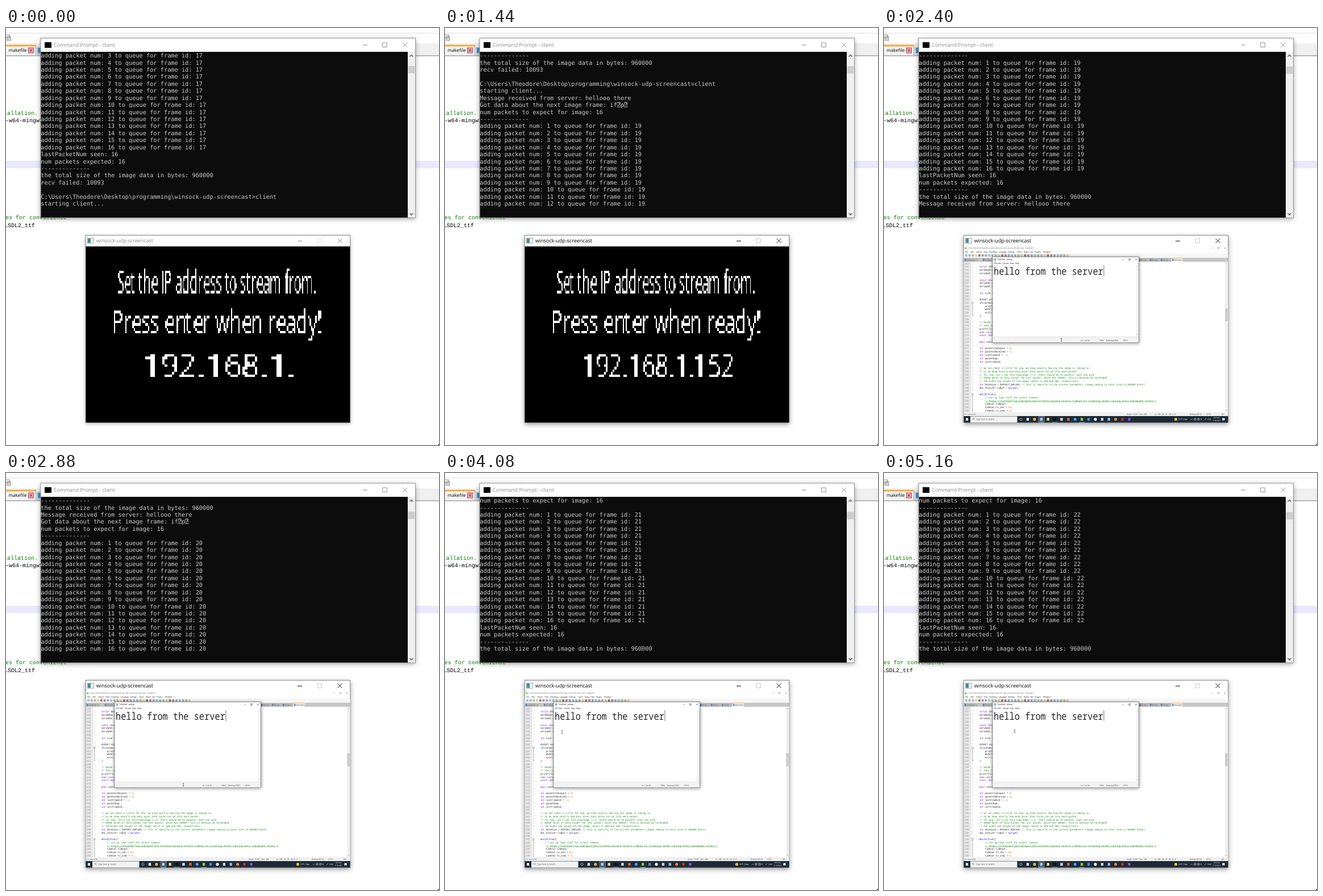
Recreate the animation shown at these times as an HTML page with a canvas. Size 762 by 735 pixels, loop 5.4 s.

```html
<!DOCTYPE html>
<html lang="en">
<head>
<meta charset="utf-8">
<title>UDP screencast</title>
<style>
html, body { margin: 0; width: 100%; height: 100%; overflow: hidden; background: #fff; }
svg, #prompt { position: absolute; left: 0; top: 0; display: block; }
text { white-space: pre; text-rendering: geometricPrecision; }
</style>
</head>
<body>
<svg id="stage" width="762" height="735" viewBox="0 0 762 735"></svg>
<canvas id="prompt" width="762" height="735"></canvas>
<script>
const SANS = '"Open Sans", "Noto Sans", sans-serif';
const MONO = '"DejaVu Sans Mono", monospace';
const COURIER = '"Liberation Mono", monospace';
const STRETCH = 1.185; // the streamed desktop is squeezed to 3:2
const LOOP = 5400;
const stage = document.getElementById('stage');

function add(parent, tag, attrs) {
  const el = document.createElementNS('http://www.w3.org/2000/svg', tag);
  for (const k in attrs) el.setAttribute(k, attrs[k]);
  return parent.appendChild(el);
}
const group = (p, attrs = {}) => add(p, 'g', attrs);
const rect = (p, x, y, width, height, fill, more = {}) =>
  add(p, 'rect', { x, y, width, height, fill, ...more });
const dot = (p, cx, cy, r, fill) => add(p, 'circle', { cx, cy, r, fill });
const line = (p, d, stroke, width = 1) =>
  add(p, 'path', { d, stroke, fill: 'none', 'stroke-width': width });
function text(p, x, y, str, size, fill = '#000', font = SANS, more = {}) {
  const el = add(p, 'text', { x, y: y + size * 0.36, fill, 'font-size': size, 'font-family': font, ...more });
  el.textContent = str;
  return el;
}
// Text inside the streamed desktop, y is the middle of the line
function tiny(p, x, y, str, size = 3.6, fill = '#333', font = SANS) {
  const g = group(p, { transform: `translate(${x} ${y}) scale(1 ${STRETCH})` });
  return text(g, 0, 0, str, size, fill, font);
}
const cross = (x, y, r) => `M${x - r} ${y - r}l${2 * r} ${2 * r}M${x + r} ${y - r}l${-2 * r} ${2 * r}`;
const box = (x, y, r) => `M${x - r} ${y - r}h${2 * r}v${2 * r}h${-2 * r}z`;
const dash = (x, y, r) => `M${x - r} ${y}h${2 * r}`;

function drawEditor(p) {
  rect(p, 0, 0, 762, 735, '#fff');
  rect(p, 0, 8.5, 762, 1, '#dcdcdc');
  line(p, 'M-1 12h7v5h-7zM2 15h6v7h-6z', '#888', 1.2);
  line(p, 'M3.5 18h3M3.5 20h3', '#999');
  rect(p, 0, 27, 762, 21.5, '#f0f0f0');
  rect(p, 0, 30, 53, 18, '#f4f4f4');
  rect(p, 0, 29.5, 53, 3, '#faaa3c');
  rect(p, 52, 30, 1, 18, '#999');
  rect(p, 54, 33, 8, 15, '#d0d0d0');
  rect(p, 56, 35, 6, 9, '#3c8fd0');
  text(p, 4.5, 39.5, 'makefile', 8.1);
  rect(p, 39.5, 35, 9, 9, '#e9b8bf', { stroke: '#b0364c' });
  line(p, cross(44, 39.5, 2.2), '#b02a40', 1.2);
  rect(p, 0, 48.3, 762, 1.2, '#8c8c8c');
  rect(p, 0, 234, 762, 13, '#e8e8ff');
  const green = '#008000';
  text(p, -4, 149, 'tallation.', 10, green, COURIER);
  text(p, -1, 162, '-w64-mingw32', 10, '#000', COURIER);
  text(p, -1, 333.5, 'es for convenience', 10, green, COURIER);
  text(p, -3, 347, 'LSDL2_ttf', 10, '#000', COURIER);
  rect(p, 760.5, 733, 1.5, 2, '#444');
}

function drawConsole(p) {
  rect(p, 61, 18, 659.5, 316.5, '#fff', { style: 'filter:drop-shadow(0 2px 4px rgba(0,0,0,.38))' });
  rect(p, 61, 18, 659.5, 316.5, '#fff', { stroke: '#8a8a8a', 'stroke-width': 0.9 });
  rect(p, 68, 25, 12, 10, '#000');
  text(p, 84, 30, 'Command Prompt - client', 9, '#8a8a8a');
  line(p, dash(632, 30, 4) + box(666.5, 29.8, 3.8) + cross(702.3, 29.8, 4), '#858585', 0.9);
  rect(p, 61.5, 42, 646, 292, '#0c0c0c');
  rect(p, 707, 42, 13, 292, '#f0f0f0');
  line(p, 'M710.5 50.5l3-3 3 3M710.5 326.5l3 3 3-3', '#505050', 1.3);
  const thumb = rect(p, 707.7, 67, 11.6, 13, '#cdcdcd');
  const rows = [];
  for (let i = 0; i < 22; i++)
    rows.push(text(p, 61.3, 48.4 + i * 12.43, '', 10.29, '#ccc', MONO));
  return { rows, thumb };
}

const CODE = `
    struct SOCKADDR_IN servAddr;
    ZeroMemory(&servAddr, sizeof(servAddr));
    servAddr.sin_family = AF_INET;

    const char* ipAddr;
    servAddr.sin_addr
    servAddr.sin_port

    int size = sizeof(

    SOCKET connSocket
    if(connect(connSocket
        printf("failed
        WSACleanup();
        exit(1);
    }

    // maybe send
    // than id
    printf("connected
    std::string msg
    const char* buf

    bool sentInitial = false;

    int packetsToExpect = 0;
    int packetsReceived = 0;
    int lastFrameId = -1;
    int packetNum;
    int currFrameId;

    // we can cheat a little for now. we know exactly how big the image is coming in,
    // so we know exactly how many pixel data bytes can go into each packet.
    // for now, let's use this knowledge (i.e. there should be 16 packets, each one with
    // 60000 bytes of data except the last packet, which has 58000). this is because we hardcoded
    // the width and height of the image, which is 600 and 400, respectively.
    int dataSize = DEFAULT_BUFLEN; // this is specific to the current parameters (image coming in total size is 960000 bytes)
    SDL_Texture* txBuf = nullptr;

    while(true){
        // set up time stuff for select timeout
        // https://stackoverflow.com/questions/21743231/winsock-selects-timeout-on-listening-socket-causing-every-subsequent-select-r
        timeval timeout;
        timeout.tv_sec = 60;
        timeout.tv_usec = 0;`.split('\n');

function codeLine(p, y, str) {
  const el = tiny(p, 158.3, y, '', 4.03, '#222', COURIER);
  const parts = str.split(/(\/\/.*|\b(?:int|const|char|bool|struct)\b|\b(?:while|if|true|false|nullptr)\b|\b\d+\b)/);
  for (const s of parts) {
    const fill = /^\/\//.test(s) ? '#1c8a1c' : /^(int|const|char|bool|struct)$/.test(s) ? '#8000ff'
      : /^(while|if|true|false|nullptr)$/.test(s) ? '#0000d0' : /^\d+$/.test(s) ? '#ff8000' : '#222';
    add(el, 'tspan', { fill }).textContent = s;
  }
}

function drawNotes(p) {
  rect(p, 191, 403.5, 257.5, 151, '#fff', {
    stroke: '#666', 'stroke-width': 0.7, style: 'filter:drop-shadow(0 1px 3px rgba(0,0,0,.45))' });
  rect(p, 194, 406, 3, 4, '#6fb4d6');
  tiny(p, 199, 408, '*Untitled - Jotting', 3.3, '#111');
  line(p, dash(420.5, 408, 1.3) + box(432, 408, 1.3) + cross(443.5, 408, 1.3), '#333', 0.6);
  ['File', 'Edit', 'Format', 'View', 'Help'].forEach((s, i) =>
    tiny(p, [193.5, 200, 209, 221.5, 231][i], 415, s, 3.2, '#111'));
  rect(p, 443.5, 418, 4.5, 125, '#f3f3f3');
  line(p, 'M445 421l1-1 1 1M445 540l1 1 1-1', '#888', 0.5);
  rect(p, 191.5, 543, 256.5, 4.8, '#f0f0f0');
  rect(p, 191.5, 547.8, 256.5, 6.4, '#f3f3f3');
  [[346, 'Ln 1, Col 22'], [379, '100%'], [391, 'Desktop (CRLF)'], [420.5, 'UTF-8']]
    .forEach(([x, s]) => tiny(p, x, 551, s, 3));
  tiny(p, 193, 428, 'hello from the server', 15.3, '#262626', '"Noto Sans Mono", monospace');
  rect(p, 386.6, 418, 0.7, 19, '#333');
}

function drawTaskbar(p) {
  rect(p, 140.5, 684, 465, 11.5, '#1d2a36');
  rect(p, 144, 687.5, 4, 4.5, '#fff');
  rect(p, 152, 684.5, 82.5, 11, '#f3f3f3');
  add(p, 'circle', { cx: 157.5, cy: 689, r: 1.4, fill: 'none', stroke: '#444', 'stroke-width': 0.5 });
  tiny(p, 162, 690, 'Type here to search', 3.5, '#555');
  rect(p, 271, 684, 12, 11.5, '#4d5a65');
  add(p, 'circle', { cx: 241, cy: 689.7, r: 2, fill: 'none', stroke: '#fff', 'stroke-width': 0.6 });
  const icons = ['#ddd', '#e0b040', '#9ad4e8', '#f0d070', '#111', '#d8d8d8', '#e06030', '#40a0e0', '#8cc63f',
    '#4a90d0', '#e8e8e8', '#c8d4dc', '#90b8d8', '#e08030', '#c03030', '#8050d0'];
  icons.forEach((c, i) => {
    const x = 253 + i * 11.9;
    if (i % 3 === 1) dot(p, x, 689.7, 2.7, c);
    else rect(p, x - 2.2, 687.2, 4.4, 5, c);
  });
  [277, 300.6, 348].forEach(x => rect(p, x - 5, 694.6, 10, 0.9, '#76b9ed'));
  dot(p, 513.5, 689.7, 2.6, '#f2b632');
  tiny(p, 518, 690, '53°F  Clear', 3.3, '#fff');
  line(p, 'M540 690.5l1.5-1.5 1.5 1.5M546 688h3v3h-3zM552 688h3v3h-3zM558 691v-3M564 691l3-3', '#ddd', 0.7);
  tiny(p, 569.5, 690, 'ENG', 3, '#fff');
  tiny(p, 580, 687.2, '8:03 AM', 2.8, '#fff');
  tiny(p, 578.5, 692, '1/12/2022', 2.8, '#fff');
  rect(p, 595.5, 687.5, 4, 4, '#fff');
}

function drawDesktop(p) {
  rect(p, 140.5, 385, 465, 310.5, '#fff');
  rect(p, 142.5, 386.5, 2.5, 3.5, '#8cc63f');
  tiny(p, 146, 388, 'C:\\Users\\lena\\Desktop\\my_projects\\winsock-udp-screencast\\client.cpp - Notepad++', 3.05, '#666');
  line(p, dash(577, 388, 1.2) + box(588.5, 388, 1.2) + cross(600, 388, 1.2), '#777', 0.5);
  let x = 143;
  for (const s of 'File Edit Search View Encoding Language Settings Tools Macro Run Plugins Window ?'.split(' ')) {
    tiny(p, x, 394.3, s, 3.2, '#222');
    x += s.length * 1.75 + 2.6;
  }
  rect(p, 140.5, 397.5, 465, 7.5, '#f6f6f6');
  const tools = ['#7aa7d8', '#e0b860', '#6b8fc0', '#9b9b9b', '#c05050', '#78a878', '#555'];
  for (let i = 0; i < 32; i++)
    rect(p, 143 + i * 5.75, 399, 3.6, 3.8, tools[i * 5 % 7], { opacity: 0.75 });
  rect(p, 140.5, 405, 465, 7, '#c6c6c6');
  for (const tx of [141, 173, 448, 467, 486]) {
    rect(p, tx, 406, 18.5, 6, '#b8b8b8');
    rect(p, tx + 1, 407, 2.5, 3.5, '#4c82c4');
    tiny(p, tx + 4.5, 409, tx === 141 ? 'screencast.cpp' : 'file.cpp', 2.8, '#555');
  }
  rect(p, 506, 405, 19.5, 7, '#f6f6f6');
  rect(p, 506, 405, 19.5, 1, '#faaa3c');
  rect(p, 507, 407, 2.5, 3.5, '#4c82c4');
  tiny(p, 510, 409, 'client.cpp', 2.8, '#111');
  line(p, cross(523.5, 409, 0.8), '#b02a40', 0.5);

  rect(p, 140.5, 412, 12.5, 265, '#e8e8e8');
  rect(p, 153, 412, 5, 265, '#f6f6f6');
  CODE.forEach((s, i) => {
    const y = 415 + i * 5.76;
    tiny(p, 142, y, 151 + i, 4.03, '#999', COURIER);
    if (s) codeLine(p, y, s);
  });
  line(p, box(155.7, 484.5, 1.4) + box(155.7, 645.5, 1.4) + 'M155.7 486v21h2M155.7 647v30', '#888', 0.5);
  rect(p, 179, 658.8, 301, 0.4, '#1c8a1c');
  rect(p, 600, 412, 5.5, 265, '#f0f0f0');
  rect(p, 600.3, 494, 4.6, 23, '#cdcdcd');
  line(p, 'M601.5 416l1.2-1.2 1.2 1.2M601.5 673l1.2 1.2 1.2-1.2', '#666', 0.5);
  rect(p, 140.5, 677, 465, 7, '#f0f0f0');
  [[141.5, 'C++ source file'], [427, 'length : 16,207   lines : 488'], [476, 'Ln : 208   Col : 25   Sel : 0 | 0'],
    [538, 'Desktop (CR LF)'], [567, 'UTF-8'], [594, 'INS']].forEach(([tx, s]) => tiny(p, tx, 680.6, s, 2.9));
  drawTaskbar(p);
  drawNotes(p);
  return line(p, 'M-1.2 -2.5h2.4M0 -2.5v5M-1.2 2.5h2.4', '#222', 0.6);
}

function drawPlayer(p) {
  const frame = rect(p, 140, 365, 466, 330.5, '#fff');
  rect(p, 140.3, 365.3, 465.4, 330.2, '#fff', { stroke: '#6a6a6a', 'stroke-width': 0.8 });
  rect(p, 143.3, 370.3, 11, 9, '#f4f4f4', { stroke: '#8a8f94', 'stroke-width': 0.8 });
  rect(p, 144, 371.2, 5, 7.4, '#3f8f8c');
  const title = text(p, 158.7, 375, 'winsock-udp-screencast', 9);
  const caps = line(p, dash(517, 375.5, 4) + cross(587.5, 375, 4), '#000');
  const max = line(p, box(551.6, 375, 3.7), '#ccc', 0.9);
  rect(p, 140.4, 385, 465, 310.3, '#000');
  const desktop = group(p);
  const mouse = drawDesktop(desktop);
  return { frame, title, caps, max, desktop, mouse };
}

// Log: the tail of an earlier run, then five streamed images
const RULE = '-'.repeat(14);
const packets = (id, from = 1) =>
  Array.from({ length: 17 - from }, (_, i) => `adding packet num: ${from + i} to queue for frame id: ${id}`);
const ending = ['lastPacketNum seen: 16', 'num packets expected: 16', RULE,
  'the total size of the image data in bytes: 960000'];
const log = [...packets(17, 3), ...ending, 'recv failed: 10093', '',
  'C:\\Users\\Theodore\\Desktop\\programming\\winsock-udp-screencast>client', 'starting client...'];
for (const id of [19, 19, 20, 21, 22])
  log.push('Message received from server: hellooo there', 'Got data about the next image frame: if\u2370p\u2370',
    'num packets to expect for image: 16', RULE, ...packets(id), ...ending);

// Each run: start time, lines before it, lines added at every 120 ms tick
const RUNS = [
  [0, 22, [0]],
  [1320, 22, [8, 16, 24]],
  [1680, 46, [5, 9, 13, 17, 21, 24, 25]],
  [2520, 70, [5, 10, 15, 20, 24]],
  [3600, 94, [8, 12, 16, 20, 24]],
  [4560, 118, [5, 10, 15, 20, 24]]
];
const MOUSE = [[0, 312, 549.5], [3120, 295.5, 506], [4080, 206, 456.5], [5160, 230, 455]];
const ADDRESS = [[0, ''], [600, '1'], [720, '15'], [840, '152']];
const at = (table, t) => table.filter(row => row[0] <= t).pop();

function lineCount(t) {
  const [start, base, added] = at(RUNS, t);
  return base + added[Math.min(added.length - 1, Math.floor((t - start) / 120))];
}

// Coarse one-bit lettering, enlarged without smoothing
const TEX_W = 320, TEX_H = 20, BASE = 14;
const prompt = document.getElementById('prompt');
const pen = prompt.getContext('2d');
const tex = document.createElement('canvas');
tex.width = TEX_W;
tex.height = TEX_H;
const ink = tex.getContext('2d', { willReadFrequently: true });
ink.textRendering = 'geometricPrecision';
const PX = 13, FINE = 100;

// Start every glyph on a whole pixel so that its stem stays one pixel wide
function setGlyphs(str) {
  let x = 2;
  for (const ch of str) {
    ink.font = `${PX * FINE}px ${SANS}`;
    const m = ink.measureText(ch);
    const bearing = -m.actualBoundingBoxLeft / FINE;
    ink.font = `${PX}px ${SANS}`;
    ink.fillText(ch, Math.round(x + bearing) - bearing, BASE);
    x += m.width / FINE;
  }
}

function bitText(str, x, base, width, cell = 4.4) {
  ink.clearRect(0, 0, TEX_W, TEX_H);
  ink.fillStyle = '#fff';
  setGlyphs(str);
  const img = ink.getImageData(0, 0, TEX_W, TEX_H);
  let left = TEX_W, right = 0;
  for (let i = 0; i < img.data.length; i += 4) {
    const on = img.data[i + 3] > 122;
    img.data.fill(on ? 255 : 0, i, i + 4);
    if (!on) continue;
    const col = (i >> 2) % TEX_W;
    left = Math.min(left, col);
    right = Math.max(right, col);
  }
  ink.putImageData(img, 0, 0);
  pen.imageSmoothingEnabled = false;
  pen.drawImage(tex, left, 0, right - left + 1, TEX_H, x, base - BASE * cell, width, TEX_H * cell);
}

let shown = null;
function drawPrompt(typed) {
  if (typed === shown) return;
  shown = typed;
  pen.clearRect(0, 0, 762, 735);
  bitText('Set the IP address to stream from.', 197, 467.5, 348);
  bitText('Press enter when ready!', 189.5, 538, 365);
  bitText('192.168.1.' + typed, 245, 615, 261, 4.5);
}

drawEditor(stage);
const term = drawConsole(group(stage));
const player = drawPlayer(group(stage));

function render(t) {
  const n = lineCount(t);
  const partial = t >= 5040 && t < 5160;
  term.rows.forEach((row, i) => {
    let s = log[n - 22 + i];
    if (partial && i === 21) s = s[0];
    if (row.textContent !== s) row.textContent = s;
  });
  term.thumb.setAttribute('y', 67 + (n - 22) / 60);

  const active = t >= 120;
  const depth = Math.min(3, Math.floor(t / 120)) / 3;
  player.frame.style.filter = `drop-shadow(0 ${2 + depth}px ${3 + depth * 1.5}px rgba(0,0,0,${0.32 + depth * 0.1}))`;
  player.title.setAttribute('fill', active ? '#000' : '#8a8a8a');
  player.caps.setAttribute('stroke', active ? '#111' : '#8f8f8f');
  player.max.setAttribute('stroke', active ? '#c4c4c4' : '#ddd');

  const live = t >= 1560;
  player.desktop.style.display = live ? '' : 'none';
  prompt.style.display = live ? 'none' : '';
  drawPrompt(at(ADDRESS, t)[1]);
  const [, mx, my] = at(MOUSE, t);
  player.mouse.setAttribute('transform', `translate(${mx} ${my})`);
}

const begin = performance.now();
function tick() {
  render((performance.now() - begin) % LOOP);
  requestAnimationFrame(tick);
}
tick();
</script>
</body>
</html>
```
